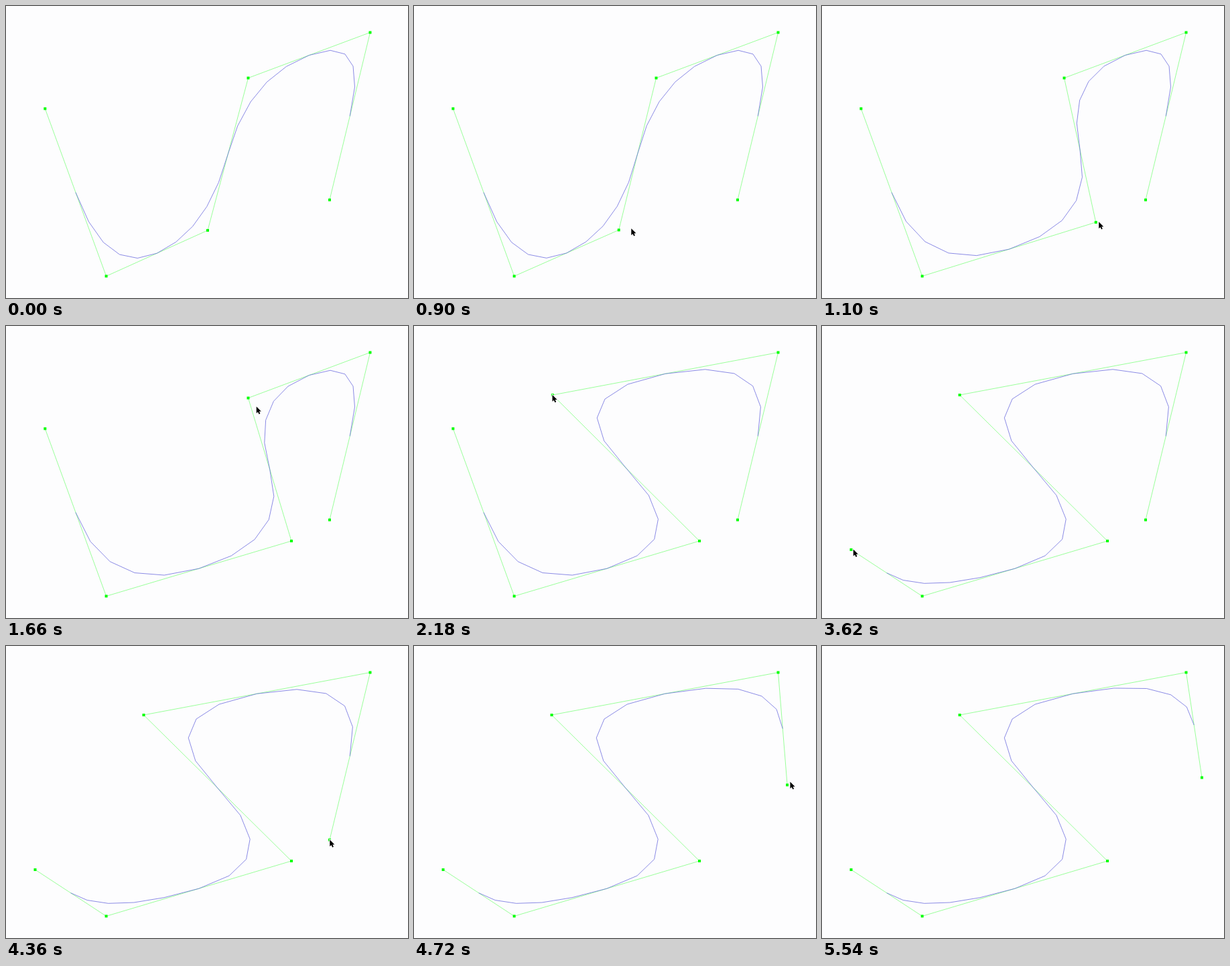
An HTML page with a canvas that plays this animation: 600 by 436 pixels, repeating every 5.96 s.

```html
<!DOCTYPE html>
<html lang="en">
<head>
<meta charset="utf-8">
<title>Quadratic B-spline editing</title>
<style>
html, body { margin: 0; width: 100%; height: 100%; overflow: hidden; background: #fdfdfe; }
canvas { display: block; width: 600px; height: 436px; }
</style>
</head>
<body>
<canvas id="stage" width="600" height="436"></canvas>
<script>
const ctx = document.getElementById('stage').getContext('2d');
const LOOP = 5960, LAG = 21, STEPS = 5;
const SHOW = 300, LEAVE = 5400, HIDE = 5540;
const ENTRY = [345, 250];

const START = [[58.3, 153.3], [149.6, 403.4], [301, 335], [361.5, 107.5], [543.5, 39.5], [483, 289.5]];

// The pointer travels to a point (bowing sideways), then drags it to a new place
const MOVES = [
  { point: 2, travel: [300, 700], bow: 0, drag: [875, 1400], to: [426, 321] },
  { point: 3, travel: [1500, 1820], bow: 8, drag: [1840, 2300], to: [205.5, 103] },
  { point: 0, travel: [2580, 2980], bow: -17, drag: [3160, 3580], to: [43.5, 334] },
  { point: 5, travel: [3620, 4360], bow: 135, drag: [4580, 4870], to: [567, 196.5] }
];

const mix = (a, b, u) => [a[0] + (b[0] - a[0]) * u, a[1] + (b[1] - a[1]) * u];
const middle = (a, b) => mix(a, b, 0.5);
const easeOut = u => 1 - (1 - u) ** 4;
const progress = (t, [from, to]) => Math.min(1, Math.max(0, (t - from) / (to - from)));

const dragged = (move, t) => mix(START[move.point], move.to, easeOut(progress(t, move.drag)));

function pointerAt(t) {
  let rest = ENTRY;
  for (const move of MOVES) {
    const u = progress(t, move.travel);
    if (u < 1) {
      const [x, y] = mix(rest, START[move.point], easeOut(u));
      return [x + move.bow * Math.sin(Math.PI * u), y];
    }
    if (t < move.drag[1]) return dragged(move, t);
    rest = move.to;
  }
  return [rest[0] + 10 * progress(t, [LEAVE, HIDE]), rest[1]];
}

function pointsAt(t) {
  const points = START.slice();
  for (const move of MOVES) points[move.point] = dragged(move, t - LAG);
  return points;
}

// Each inner control point shapes one parabola between edge midpoints
function splineThrough(p) {
  const curve = [middle(p[0], p[1])];
  for (let i = 1; i < p.length - 1; i++) {
    const a = middle(p[i - 1], p[i]), b = middle(p[i], p[i + 1]);
    for (let s = 1; s <= STEPS; s++) {
      const u = s / STEPS;
      curve.push(mix(mix(a, p[i], u), mix(p[i], b, u), u));
    }
  }
  return curve;
}

function trace(points) {
  ctx.beginPath();
  points.forEach(([x, y]) => ctx.lineTo(x, y));
}

function polyline(points, color) {
  trace(points);
  ctx.strokeStyle = color;
  ctx.lineWidth = 0.75;
  ctx.stroke();
}

function drawPointer([x, y]) {
  ctx.save();
  ctx.translate(x + 0.3, y - 0.3);
  ctx.scale(0.88, 0.88);
  trace([[0, 0], [0, 11.5], [2.6, 9.2], [4.4, 13], [6.4, 12.1], [4.7, 8.4], [8.1, 8.2]]);
  ctx.closePath();
  ctx.strokeStyle = '#fff';
  ctx.lineWidth = 2;
  ctx.lineJoin = 'round';
  ctx.stroke();
  ctx.fillStyle = '#000';
  ctx.fill();
  ctx.restore();
}

function draw(t) {
  ctx.fillStyle = '#fdfdfe';
  ctx.fillRect(0, 0, 600, 436);
  const points = pointsAt(t);
  polyline(points, '#78ff78');
  polyline(splineThrough(points), '#6464dc');
  ctx.fillStyle = '#0f0';
  points.forEach(([x, y]) => ctx.fillRect(x - 2, y - 2, 4, 4));
  if (t >= SHOW && t < HIDE) drawPointer(pointerAt(t));
}

const begin = performance.now();
function frame() {
  draw((performance.now() - begin) % LOOP);
  requestAnimationFrame(frame);
}
frame();
</script>
</body>
</html>
```
